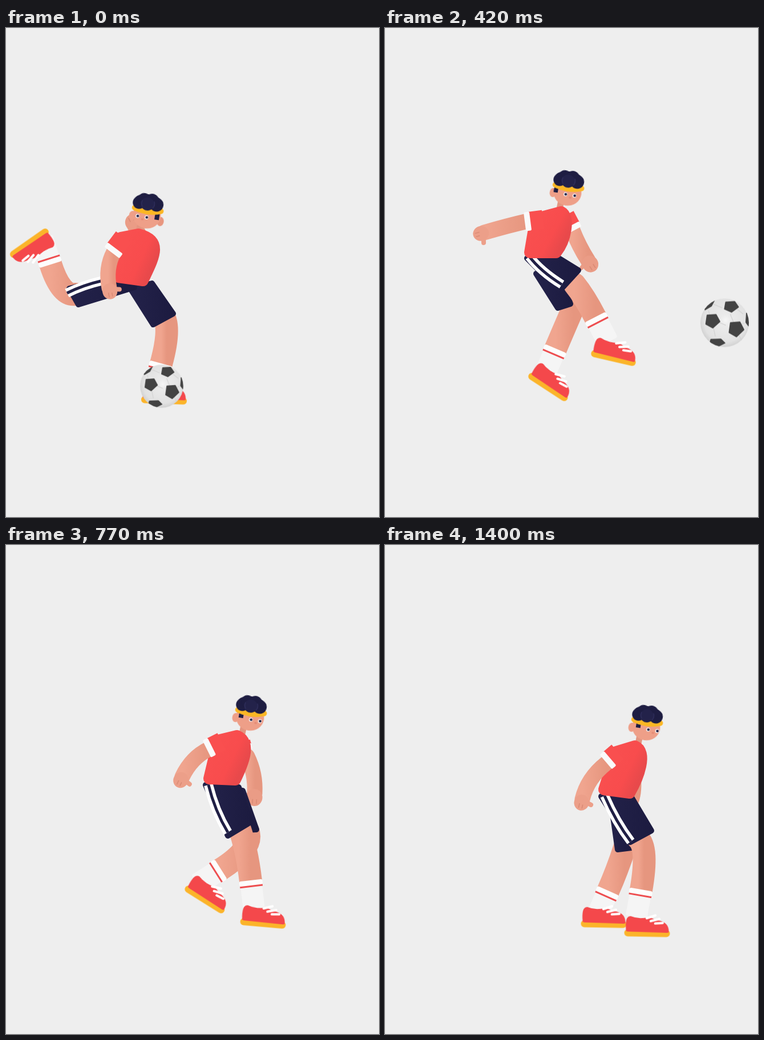
An HTML page without scripts for the animation above (1470 ms loop, 654x856 px).

```html
<!DOCTYPE html>
<html lang="en">
<head>
<meta charset="utf-8">
<title>Football kick</title>
<style>
html, body { margin: 0; width: 100%; height: 100%; overflow: hidden; background: #eee; }
svg { display: block; width: 654px; height: 856px; }
marker { overflow: visible; }

/* Poses are held for 70 ms each, so every gap between keyframes is stepped. */
.move { animation: 1470ms steps(2) infinite; }
.limb { fill: none; stroke: url(#skin); stroke-width: 40; stroke-linecap: round; }
.arm { stroke-width: 27; }
.sleeve { fill: none; stroke: #f94f4f; stroke-width: 33; marker-end: url(#cuff); }
.shorts { fill: url(#navy); stroke: url(#navy); stroke-width: 10; stroke-linejoin: round; }
.torso { fill: url(#red); stroke: url(#red); stroke-width: 20; stroke-linejoin: round; }
.stripe { fill: none; }

.head { animation-name: head; }
.gaze { animation-name: gaze; }
.ear { animation-name: ear; }
.torso { animation-name: torso; }
.near-arm { animation-name: near-arm; marker-end: url(#near-hand); }
.far-arm { animation-name: far-arm; marker-end: url(#far-hand); }
.near-sleeve { animation-name: near-sleeve; }
.far-sleeve { animation-name: far-sleeve; }
.near-leg { animation-name: near-leg; marker-end: url(#sock); }
.far-leg { animation-name: far-leg; marker-end: url(#sock); }
.near-shorts { animation-name: near-shorts; }
.far-shorts { animation-name: far-shorts; }
.stripe { animation-name: stripe; }
.near-shoe { animation-name: near-shoe; }
.far-shoe { animation-name: far-shoe; }
.ball { animation-name: ball; }

@keyframes head {
  0% { transform: translate(247px, 328px) }
  9.52% { transform: translate(270px, 319px) }
  19.04% { transform: translate(296px, 313px) }
  28.57% { transform: translate(320px, 288px); animation-timing-function: steps(3) }
  42.85% { transform: translate(379px, 288px) }
  52.38% { transform: translate(428px, 302px); animation-timing-function: steps(3) }
  66.66% { transform: translate(464px, 313px); animation-timing-function: steps(6) }
  95.23%, 100% { transform: translate(458px, 319px) }
}
@keyframes gaze {
  0% { transform: translate(-8px); animation-timing-function: steps(4) }
  19.04% { transform: translate(-1px) }
  28.57% { transform: translate(5px); animation-timing-function: steps(3) }
  42.85% { transform: translate(8px) }
  52.38% { transform: translate(10px); animation-timing-function: steps(9) }
  95.23%, 100% { transform: translate(12px) }
}
@keyframes ear {
  0% { transform: translate(0); animation-timing-function: steps(4) }
  19.04% { transform: translate(-3px) }
  28.57%, 100% { transform: translate(-14px) }
}
@keyframes torso {
  0% { d: path("M201 367L232 361C276 372 260 400 240 442L197 436z") }
  9.52% { d: path("M221 362L258 353C290 363 277 392 265 423L214 426z") }
  19.04% { d: path("M241 357L285 347C304 355 294 385 288 404L231 416z") }
  28.57% { d: path("M264 334L309 322C325 330 317 372 300 393L254 393z"); animation-timing-function: steps(3) }
  42.85% { d: path("M320 332L366 321C392 332 376 380 354 397L310 395z") }
  52.38% { d: path("M372 342L405 334C434 346 412 390 402 411L356 409z"); animation-timing-function: steps(3) }
  66.66% { d: path("M412 356L446 348C466 360 447 405 432 428L391 422z"); animation-timing-function: steps(6) }
  95.23%, 100% { d: path("M405 362L438 352C462 362 444 408 429 434L384 428z") }
}
@keyframes near-sleeve {
  0% { d: path("M206 366L191 386") }
  9.52% { d: path("M232 360L212 374") }
  19.04% { d: path("M258 353L230 361") }
  28.57% { d: path("M277 335L254 338"); animation-timing-function: steps(3) }
  42.85% { d: path("M330 334L311 340") }
  52.38% { d: path("M378 344L360 353"); animation-timing-function: steps(3) }
  66.66% { d: path("M415 356L401 369"); animation-timing-function: steps(6) }
  95.23%, 100% { d: path("M408 362L394 374") }
}
@keyframes near-arm {
  0% { d: path("M189 392Q174 420 181 455") }
  9.52% { d: path("M207 378Q180 405 168 428") }
  19.04% { d: path("M224 362Q190 378 152 389") }
  28.57% { d: path("M250 338Q215 346 174 358"); animation-timing-function: steps(3) }
  42.85% { d: path("M308 341Q280 352 247 373") }
  52.38% { d: path("M356 357Q325 372 309 406"); animation-timing-function: steps(3) }
  66.66% { d: path("M397 376Q365 395 343 433"); animation-timing-function: steps(6) }
  95.23%, 100% { d: path("M388 382Q355 408 346 445") }
}
@keyframes far-sleeve {
  0% { d: path("M240 375L240 380") }
  9.52% { d: path("M262 372L264 378") }
  19.04% { d: path("M287 372L292 380") }
  28.57% { d: path("M316 328L326 347"); animation-timing-function: steps(3) }
  42.85% { d: path("M374 333L382 358") }
  52.38% { d: path("M412 345L414 352"); animation-timing-function: steps(3) }
  66.66% { d: path("M445 365L443 375"); animation-timing-function: steps(6) }
  95.23%, 100% { d: path("M438 370L436 380") }
}
@keyframes far-arm {
  0% { d: path("M240 375Q232 360 226 347") }
  9.52% { d: path("M262 385Q270 385 272 392") }
  19.04% { d: path("M300 395Q318 408 325 428") }
  28.57% { d: path("M329 354Q340 382 356 407"); animation-timing-function: steps(3) }
  42.85% { d: path("M384 362Q393 390 408 416") }
  52.38% { d: path("M423 370Q438 400 436 435"); animation-timing-function: steps(3) }
  66.66% { d: path("M444 395Q450 430 444 448"); animation-timing-function: steps(6) }
  95.23%, 100% { d: path("M435 400Q438 430 432 446") }
}
@keyframes near-leg {
  0% { d: path("M122 466Q96 470 78 413") }
  9.52% { d: path("M212 488Q195 520 167 548") }
  19.04% { d: path("M303 443Q322 430 309 520") }
  28.57% { d: path("M332 448Q350 470 369 507"); animation-timing-function: steps(3) }
  42.85% { d: path("M380 465Q397 485 406 541") }
  52.38% { d: path("M408 492Q422 530 429 588"); animation-timing-function: steps(3) }
  66.66% { d: path("M446 512Q458 535 449 604"); animation-timing-function: steps(6) }
  95.23%, 100% { d: path("M444 514Q462 530 449 604") }
}
@keyframes far-leg {
  0% { d: path("M278 508Q288 530 272 588") }
  9.52% { d: path("M283 506Q290 532 277 584") }
  19.04% { d: path("M290 505Q290 535 281 578") }
  28.57% { d: path("M330 490Q316 522 299 562"); animation-timing-function: steps(3) }
  42.85% { d: path("M378 503Q365 527 345 547") }
  52.38% { d: path("M424 500Q436 530 376 568"); animation-timing-function: steps(3) }
  66.66% { d: path("M418 525Q404 570 389 606"); animation-timing-function: steps(6) }
  95.23%, 100% { d: path("M420 530Q407 570 391 606") }
}
@keyframes near-shorts {
  0% { d: path("M190 437L225 454 127 484 111 456z") }
  9.52% { d: path("M214 432L262 440 232 505 190 488z") }
  19.04% { d: path("M226 425L290 416 317 424 294 463z") }
  28.57% { d: path("M249 403L300 400 339 424 306 460z"); animation-timing-function: steps(3) }
  42.85% { d: path("M304 405L360 407 394 445 360 468z") }
  52.38% { d: path("M350 420L408 424 429 485 389 509z"); animation-timing-function: steps(3) }
  66.66% { d: path("M385 433L438 436 466 500 428 517z"); animation-timing-function: steps(6) }
  95.23%, 100% { d: path("M379 440L433 443 467 500 430 520z") }
}
@keyframes far-shorts {
  0% { d: path("M218 456L256 447 293 500 258 519z") }
  9.52% { d: path("M235 452L280 450 298 502 268 518z") }
  19.04% { d: path("M257 450L300 455 303 505 284 515z") }
  28.57% { d: path("M265 430L310 440 325 483 303 490z"); animation-timing-function: steps(3) }
  42.85% { d: path("M320 430L380 440 380 475 367 491z") }
  52.38% { d: path("M395 428L415 430 439 498 400 500z"); animation-timing-function: steps(3) }
  66.66% { d: path("M397 450L430 450 430 525 404 527z"); animation-timing-function: steps(6) }
  95.23%, 100% { d: path("M397 455L430 455 432 530 408 533z") }
}
@keyframes stripe {
  0% { d: path("M107 464Q135 450 170 442") }
  9.52% { d: path("M216 436Q206 460 192 488") }
  19.04% { d: path("M223 426Q250 441 292 447") }
  28.57% { d: path("M253 400Q273 426 310 449"); animation-timing-function: steps(3) }
  42.85% { d: path("M309 403Q333 439 362 465") }
  52.38% { d: path("M355 420Q366 465 389 503"); animation-timing-function: steps(3) }
  66.66% { d: path("M390 433Q406 480 430 516"); animation-timing-function: steps(6) }
  95.23%, 100% { d: path("M385 439Q405 485 431 519") }
}
@keyframes near-shoe {
  0% { transform: translate(68px, 391px) rotate(145deg) }
  9.52% { transform: translate(138px, 580px) rotate(68deg) }
  19.04% { transform: translate(305px, 566px) rotate(22deg) }
  28.57% { transform: translate(393px, 548px) rotate(13deg); animation-timing-function: steps(3) }
  42.85% { transform: translate(417px, 586px) rotate(16deg) }
  52.38% { transform: translate(439px, 634px) rotate(5deg); animation-timing-function: steps(3) }
  66.66%, 100% { transform: translate(446px, 652px) rotate(1deg) }
}
@keyframes far-shoe {
  0% { transform: translate(264px, 624px) rotate(2deg); animation-timing-function: steps(4) }
  19.04% { transform: translate(268px, 621px) rotate(5deg) }
  28.57% { transform: translate(289px, 598px) rotate(33deg); animation-timing-function: steps(3) }
  42.85% { transform: translate(324px, 573px) rotate(36deg) }
  52.38% { transform: translate(351px, 590px) rotate(32deg); animation-timing-function: steps(3) }
  66.66%, 100% { transform: translate(370px, 636px) rotate(1deg) }
}
@keyframes ball {
  0%, 14.28% { transform: translate(273px, 627px) scale(.97); animation-timing-function: steps(1) }
  19.04% { transform: translate(373px, 593px) scale(1) }
  28.57% { transform: translate(595.5px, 516px) scale(1.09); animation-timing-function: steps(1) }
  33.33%, 100% { transform: translate(760px, 460px) scale(1.1) }
}
</style>
</head>
<body>
<svg viewBox="0 0 654 856" xmlns="http://www.w3.org/2000/svg">
  <defs>
    <linearGradient id="skin"><stop stop-color="#f0a58f"/><stop offset="1" stop-color="#e6967f"/></linearGradient>
    <linearGradient id="red" y2=".6"><stop stop-color="#f95050"/><stop offset=".7" stop-color="#f84c4d"/><stop offset="1" stop-color="#e8494b"/></linearGradient>
    <linearGradient id="navy"><stop stop-color="#23224a"/><stop offset="1" stop-color="#1c1b40"/></linearGradient>
    <radialGradient id="shine" cx=".52" cy=".45" r=".56">
      <stop stop-color="#f6f6f6"/><stop offset=".2" stop-color="#ebebeb"/>
      <stop offset=".8" stop-color="#e2e2e2"/><stop offset="1" stop-color="#cfcfcf"/>
    </radialGradient>
    <clipPath id="face"><ellipse rx="24.5" ry="23"/></clipPath>
    <clipPath id="round"><circle r="39"/></clipPath>

    <marker id="cuff" orient="auto" markerUnits="userSpaceOnUse">
      <rect x="-1" y="-16.5" width="10" height="33" rx="2" fill="#fafafa"/>
    </marker>
    <marker id="near-hand" orient="auto" markerUnits="userSpaceOnUse">
      <g fill="#ec9f89">
        <ellipse cx="6" rx="14" ry="13"/>
        <path d="M3-5L6-17" stroke="#ec9f89" stroke-width="8" stroke-linecap="round"/>
        <path d="M9-3l7 0M8 3l8 0" stroke="#d98a75" stroke-width="1.5"/>
      </g>
    </marker>
    <marker id="far-hand" orient="auto" markerUnits="userSpaceOnUse">
      <g fill="#ea9c86">
        <ellipse cx="7" rx="15" ry="14"/>
        <path d="M0 5L5 17" stroke="#ea9c86" stroke-width="7" stroke-linecap="round"/>
        <path d="M10-4l8 0M10 3l8 0" stroke="#d98a75" stroke-width="1.5"/>
      </g>
    </marker>
    <marker id="sock" orient="auto" markerUnits="userSpaceOnUse">
      <rect y="-19" width="48" height="38" rx="3" fill="#f5f5f5"/>
      <rect x="-1" y="-20.5" width="9" height="41" rx="3" fill="#fdfdfd"/>
      <rect x="8" y="-20" width="3" height="40" fill="#ee4e50"/>
    </marker>

    <g id="shoe">
      <rect x="-26" y="21" width="80" height="12.5" rx="6.2" fill="#fbb42a"/>
      <path d="M-23 24Q-26-3-15-2Q0 4 17-1Q26 3 36 5Q52 9 52 24Q52 26 48 26L-20 25z" fill="#f4484b"/>
      <path d="M13 1l15-5M20 6l15-4M28 10l13-1" stroke="#fff" stroke-width="4.2" stroke-linecap="round"/>
    </g>
    <path id="patch" d="M-8-9L6-10 12 1 1 11-10 5z" stroke="#434343" stroke-width="2" stroke-linejoin="round"/>
  </defs>

  <rect width="654" height="856" fill="#eee"/>

  <path class="move limb arm far-arm"/>
  <path class="move sleeve far-sleeve"/>
  <path class="move limb far-leg"/>
  <g class="move far-shoe"><use href="#shoe"/></g>
  <path class="move shorts far-shorts"/>

  <g class="move head">
    <path d="M-11 14L-15 34" stroke="#e39580" stroke-width="11"/>
    <g transform="rotate(9)">
      <ellipse class="move ear" cx="25" cy="7" rx="6" ry="8" fill="#e8967f"/>
      <ellipse cx="-25" cy="4" rx="6" ry="8" fill="#ee9f88"/>
      <ellipse rx="24.5" ry="23" fill="#ee9f88"/>
      <g clip-path="url(#face)">
        <g class="move gaze">
          <path d="M-30-14h8V3h-8zM22-14h8V5h-8z" fill="#1e1d42"/>
          <g fill="#fff"><ellipse cx="-8" cy="3.5" rx="3.3" ry="3.6"/><ellipse cx="8" cy="3.5" rx="3.3" ry="3.6"/></g>
          <g fill="#1e1d42"><circle cx="-7.6" cy="3.5" r="2.3"/><circle cx="8.4" cy="3.5" r="2.3"/></g>
          <ellipse cx="1" cy="8" rx="2.5" ry="1.8" fill="#e48b75"/>
        </g>
      </g>
      <path d="M-23-10Q0-3 23-11" fill="none" stroke="#fbb724" stroke-width="10" stroke-linecap="round"/>
      <g fill="#1e1d42">
        <ellipse cx="-1" cy="-24" rx="25" ry="13"/>
        <circle cx="-17" cy="-20" r="11"/><circle cx="14" cy="-21" r="12"/>
        <circle cx="-9" cy="-27" r="11"/><circle cx="5" cy="-27" r="12"/>
        <circle cx="-2" cy="-20" r="11.5" fill="#23224a"/>
        <path d="M-12-25q-2 7 2 11M9-26q3 7-1 12" fill="none" stroke="#302f5c" stroke-width="1.5"/>
      </g>
    </g>
  </g>

  <path class="move limb near-leg"/>
  <g class="move near-shoe"><use href="#shoe"/></g>
  <path class="move shorts near-shorts"/>
  <path class="move stripe" stroke="#fff" stroke-width="16"/>
  <path class="move stripe" stroke="#201f45" stroke-width="5"/>
  <path class="move torso"/>
  <path class="move limb arm near-arm"/>
  <path class="move sleeve near-sleeve"/>

  <g class="move ball">
    <circle r="39" fill="url(#shine)"/>
    <g clip-path="url(#round)" fill="#434343">
      <path d="M-12-2L2 4M9-14L15 1M-18 8L-15 22M22 18L28 30M23 5L32 0M20-22L30-14M-4-24L-18-30M-24-12L-26-20" stroke="#d3d3d3" stroke-width="1.2"/>
      <use href="#patch" transform="translate(10-26)scale(1 .8)"/>
      <use href="#patch" x="-20" y="-3"/>
      <use href="#patch" transform="translate(18 10)scale(1.05 1.1)"/>
      <use href="#patch" transform="translate(-13 32)scale(1.1 .6)"/>
      <use href="#patch" transform="translate(38-6)scale(.4 1)"/>
      <use href="#patch" transform="translate(-25-29)rotate(-42)scale(1 .4)"/>
    </g>
  </g>
</svg>
</body>
</html>
```
